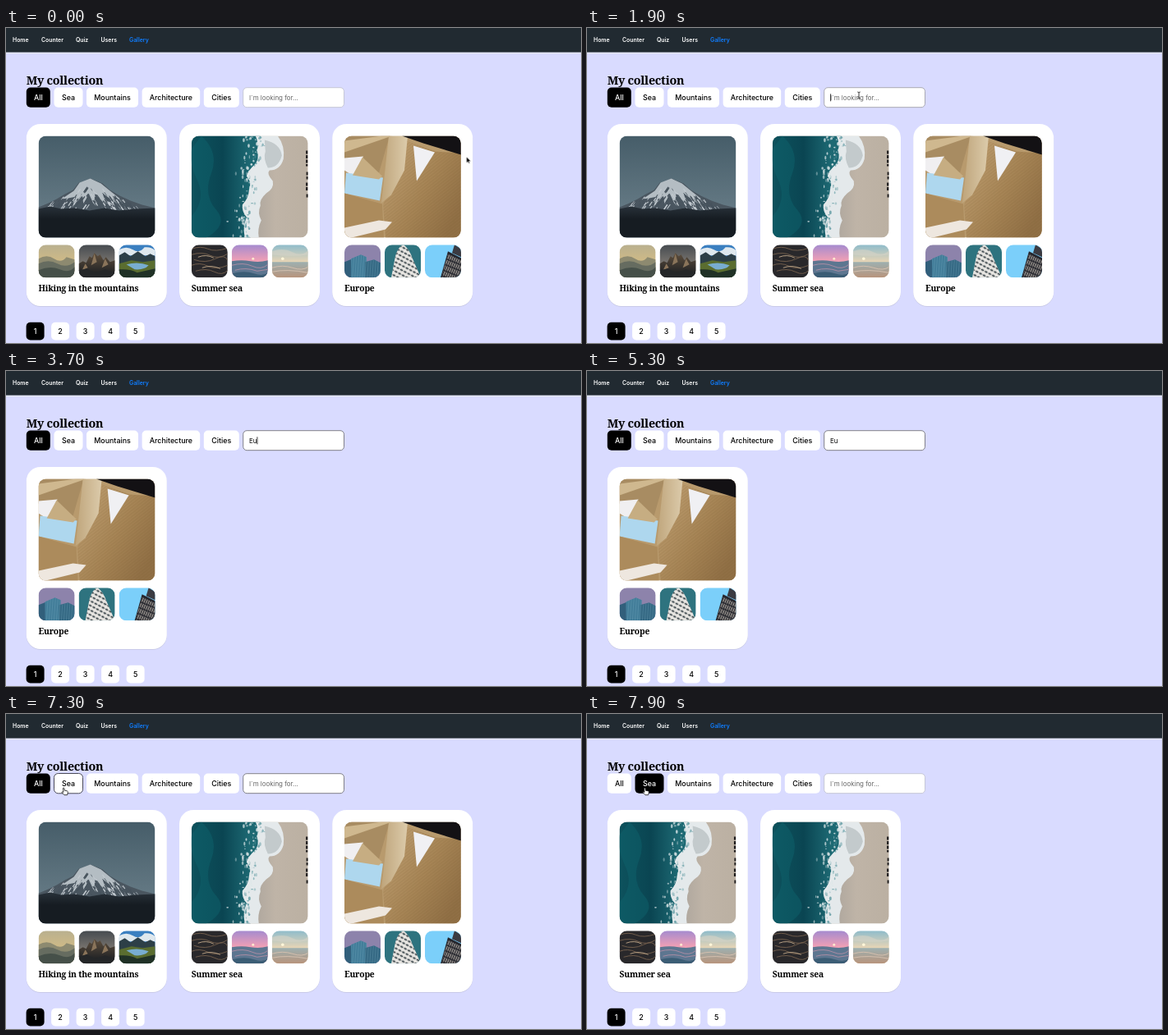
Animation of 700x384 px, one loop 8000 ms. Source, as an HTML page:

```html
<!DOCTYPE html>
<html lang="en">
<head>
<meta charset="utf-8">
<title>My collection</title>
<style>
  html, body { margin: 0; width: 100%; height: 100%; overflow: hidden; background: #d9dbff; }
  svg { display: block; width: 700px; height: 384px; }
  text { font: 500 8.9px Inter, sans-serif; fill: #000; }
  .serif { font: bold 10.3px "Noto Serif", serif; letter-spacing: -.2px; }
  .head { font-size: 14.3px; letter-spacing: -.25px; }
  .nav text { font-size: 6.9px; font-weight: 600; fill: #fff; }
  .nav .here { fill: #0f7dff; }
  .loading text { font-size: 10.2px; }
  .field text { font-size: 7.9px; font-weight: 400; }
  .field .hint { fill: #666; }
  .btn rect { fill: #fff; }
  .btn.on rect { fill: #000; }
  .btn.on text { fill: #fff; }

  .step, .step rect, .step text { animation: 8s step-end infinite; }
  .grid { animation-name: grid; }
  .found { animation-name: found; }
  .loading { animation-name: loading; }
  .picked { animation-name: picked; }
  .pages { animation-name: pages; }
  .box { animation-name: focus !important; }
  .hint { animation-name: hint !important; }
  .one { animation-name: one !important; }
  .two { animation-name: two !important; }
  .caret { animation-name: blink, caret !important; }
  .all rect { animation-name: allBox; }
  .all text { animation-name: allText; }
  .sea rect { animation-name: seaBox; }
  .sea text { animation-name: seaText; }
  .arrow { animation-name: arrow; }
  .beam { animation-name: beam; }
  .hand { animation-name: hand; }
  .mouse { animation: mouse 8s infinite; }

  @keyframes grid { 0%, 67.5% { opacity: 1 } 45%, 92.5%, 100% { opacity: 0 } }
  @keyframes found { 0%, 67.5%, 100% { opacity: 0 } 45% { opacity: 1 } }
  @keyframes loading { 0%, 98.75%, 100% { opacity: 0 } 92.5% { opacity: 1 } }
  @keyframes picked { 0% { opacity: 0 } 98.75%, 100% { opacity: 1 } }
  @keyframes pages { 0%, 98.75%, 100% { transform: none } 92.5% { transform: translateY(-209.5px) } }
  @keyframes focus { 0%, 92.5%, 100% { stroke: #c6c7d6 } 23.75% { stroke: #a9a9b2 } 25% { stroke: #808088 } }
  @keyframes hint { 0%, 70%, 100% { opacity: 1 } 40% { opacity: 0 } }
  @keyframes one { 0%, 45%, 70%, 100% { opacity: 0 } 40%, 67.5% { opacity: 1 } }
  @keyframes two { 0%, 67.5%, 100% { opacity: 0 } 45% { opacity: 1 } }
  @keyframes blink {
    0%, 30%, 51.25%, 63.75%, 76.25%, 88.75%, 100% { opacity: 0 }
    23.75%, 36.25%, 57.5%, 67.5%, 82.5% { opacity: 1 }
  }
  @keyframes caret {
    0%, 70%, 100% { transform: none }
    40%, 67.5% { transform: translateX(4.6px) }
    45% { transform: translateX(9.3px) }
  }
  @keyframes allBox { 0% { fill: #000 } 95%, 100% { fill: #fff } }
  @keyframes allText { 0% { fill: #fff } 95%, 100% { fill: #000 } }
  @keyframes seaBox {
    0% { fill: #fff; stroke: none }
    91.25% { fill: #fff; stroke: #4a4a58 }
    95%, 100% { fill: #000; stroke: none }
  }
  @keyframes seaText { 0% { fill: #000 } 95%, 100% { fill: #fff } }
  @keyframes arrow { 0% { opacity: 1 } 21.25%, 100% { opacity: 0 } }
  @keyframes beam { 0%, 40%, 83.75%, 100% { opacity: 0 } 21.25%, 81.25% { opacity: 1 } }
  @keyframes hand { 0% { opacity: 0 } 83.75%, 100% { opacity: 1 } }
  @keyframes mouse {
    0%, 3% { transform: translate(560.6px, 157px); animation-timing-function: ease-in }
    11.25% { transform: translate(538px, 142px); animation-timing-function: ease-out }
    22.5%, 81.25% { transform: translate(331px, 82px); animation-timing-function: ease-in-out }
    91.25%, 100% { transform: translate(70px, 90px) }
  }
</style>
</head>
<body>
<svg viewBox="0 0 700 384">
  <defs>
    <clipPath id="bigClip"><rect width="141.7" height="124" rx="9"/></clipPath>
    <clipPath id="smallClip"><rect width="44" height="40" rx="9"/></clipPath>

    <linearGradient id="dusk" x2="0" y2="1"><stop stop-color="#465d69"/><stop offset=".7" stop-color="#637883"/></linearGradient>
    <linearGradient id="forest" x2="0" y2="1"><stop stop-color="#283139"/><stop offset=".4" stop-color="#161c22"/></linearGradient>
    <linearGradient id="water"><stop stop-color="#0d525d"/><stop offset=".45" stop-color="#0a4552"/><stop offset=".85" stop-color="#1d6973"/></linearGradient>
    <linearGradient id="sand"><stop offset=".5" stop-color="#aaa39b"/><stop offset=".72" stop-color="#bfb4a7"/><stop offset="1" stop-color="#bbb0a2"/></linearGradient>
    <linearGradient id="beamLight"><stop stop-color="#bfa57b"/><stop offset="1" stop-color="#dccbab"/></linearGradient>
    <linearGradient id="wood" x2="1" y2=".7"><stop stop-color="#c4a477"/><stop offset=".6" stop-color="#a78556"/><stop offset="1" stop-color="#917046"/></linearGradient>
    <linearGradient id="haze" x2="0" y2="1"><stop stop-color="#b9b08f"/><stop offset=".5" stop-color="#cfba86"/></linearGradient>
    <linearGradient id="smoke" x2="0" y2="1"><stop stop-color="#464b50"/><stop offset=".6" stop-color="#7d7872"/></linearGradient>
    <linearGradient id="rock" x2="0" y2="1"><stop stop-color="#5f4f3d"/><stop offset=".8" stop-color="#232426"/></linearGradient>
    <linearGradient id="pink" x2="0" y2="1"><stop stop-color="#a58bcf"/><stop offset=".5" stop-color="#f2a0b4"/></linearGradient>
    <linearGradient id="dawn" x2="0" y2="1"><stop stop-color="#8fbccb"/><stop offset=".55" stop-color="#ecd6b4"/></linearGradient>
    <linearGradient id="shore" x2="0" y2="1"><stop stop-color="#9db0b0"/><stop offset="1" stop-color="#b8947c"/></linearGradient>

    <pattern id="grain" width="3" height="3" patternUnits="userSpaceOnUse" patternTransform="rotate(-38)">
      <path d="M0 1H3" stroke="#6f5126" stroke-opacity=".22"/>
    </pattern>
    <pattern id="panes" width="3" height="40" patternUnits="userSpaceOnUse" patternTransform="rotate(4)">
      <path d="M0 0V40" stroke="#7fb3c8" stroke-opacity=".5"/>
    </pattern>
    <pattern id="holes" width="5" height="5" patternUnits="userSpaceOnUse" patternTransform="rotate(28)">
      <ellipse cx="2.5" cy="2.5" rx="2" ry="1.1" fill="#2f3b41"/>
    </pattern>
    <pattern id="slats" width="2.6" height="7" patternUnits="userSpaceOnUse" patternTransform="rotate(22)">
      <path d="M1 0V5.6" stroke="#d9cfc4" stroke-width=".9"/>
    </pattern>

    <g id="mountains">
      <g class="big">
        <rect width="142" height="124" fill="url(#dusk)"/>
        <path d="M0 87L12 82 22 77 32 71 42 66 49 57 55 56 63 52 71 55 78 58 87 66 99 73 112 79 126 84 142 88V124H0Z" fill="#4a5660"/>
        <path d="M63 52L50 57 43 67 28 77 36 76 46 74 41 87 53 73 55 84 61 70 67 83 69 70 83 86 78 70 96 83 90 73 106 82 87 67 76 58Z" fill="#b4bdc3"/>
        <g id="ridges" stroke-linecap="round"/>
        <path d="M0 89L14 86 28 89 44 88 62 91 80 88 98 91 118 89 142 88V124H0Z" fill="url(#forest)"/>
      </g>
      <g class="small">
        <rect width="44" height="40" fill="url(#haze)"/>
        <path d="M0 17Q10 11 19 17T34 15L44 18V40H0Z" fill="#8d8a70"/>
        <path d="M0 23Q12 17 23 23T44 21V40H0Z" fill="#666c60"/>
        <path d="M0 31Q14 25 26 30T44 27V40H0Z" fill="#465049"/>
      </g>
      <g class="small">
        <rect width="44" height="40" fill="url(#smoke)"/>
        <path d="M0 23L5 20 9 22 13 14 16 16 19 10 23 14 26 12 30 19 33 15 38 21 44 19V40H0Z" fill="url(#rock)"/>
        <path d="M19 11L15 25 22 21ZM32 17L28 28 36 24ZM8 23L4 31 11 28Z" fill="#8a745a"/>
        <path d="M0 31L10 29 20 34 32 30 44 34V40H0Z" fill="#242628"/>
      </g>
      <g class="small">
        <rect width="44" height="40" fill="#3a7fc0"/>
        <path d="M0 6Q9 1 17 6T31 3Q39 2 44 7V13H0Z" fill="#dfe8ee"/>
        <path d="M0 13L7 9 14 14 23 8 32 14 38 11 44 14V40H0Z" fill="#2d3f47"/>
        <path d="M0 23L15 19 29 21 44 19V40H0Z" fill="#5a6d30"/>
        <path d="M9 24Q23 20 36 25 31 31 19 30Z" fill="#78add1"/>
        <path d="M0 30Q14 29 22 34L44 29V40H0Z" fill="#203126"/>
      </g>
    </g>

    <g id="coast">
      <g class="big">
        <rect width="142" height="124" fill="url(#sand)"/>
        <path d="M0 0H84L84 28 76 50 77 72 70 92 72 124H0Z" fill="url(#water)"/>
        <path d="M12 0Q34 20 24 46T30 90 18 124H0V98Q18 78 7 54T0 16Z" fill="#0f626c" opacity=".5"/>
        <path d="M78 0Q82 9 80 18 83 28 77 35 69 42 67 49 74 57 70 66 70 75 62 84 61 92 67 99 62 111 65 124H82Q80 113 85 103 80 94 84 85 82 78 91 70 101 64 99 55 91 46 95 42 108 42 112 28 114 12 105 0Z" fill="#e4e9eb"/>
        <path d="M89 5Q108 9 110 24 106 39 93 39 87 27 90 19Z" fill="#c3cacc"/>
        <g id="foam"/>
        <path d="M140.5 18V37M141 44V53M140.5 57V67M141 71V76" stroke="#1c1a1b" stroke-width="2.4" stroke-dasharray="4 1.5"/>
      </g>
      <g class="small">
        <rect width="44" height="40" fill="#29282b"/>
        <path d="M0 5Q11 1 20 5T44 4M0 12Q13 8 23 13T44 11M3 18Q17 23 29 17T44 19M0 25Q10 21 20 26T44 25M5 32Q18 28 28 33T44 31" fill="none" stroke="#76614f" stroke-width=".9"/>
        <path d="M8 15Q18 11 27 16M13 28Q24 24 35 29" fill="none" stroke="#d6ba97" stroke-width=".8"/>
      </g>
      <g class="small">
        <rect width="44" height="40" fill="url(#pink)"/>
        <circle cx="26" cy="17" r="1.5" fill="#ffe9cf"/>
        <path d="M0 20Q12 18 23 20T44 19V40H0Z" fill="#5d7690"/>
        <path d="M0 25Q14 21 25 26T44 24M4 31Q17 27 31 32L44 30" fill="none" stroke="#a98ca3"/>
        <path d="M0 35Q16 31 27 35T44 34V40H0Z" fill="#3b5d75"/>
      </g>
      <g class="small">
        <rect width="44" height="40" fill="url(#dawn)"/>
        <path d="M0 8Q14 3 25 9T44 7V12Q25 15 0 12Z" fill="#d8d4c7" opacity=".6"/>
        <circle cx="13" cy="17" r="1.8" fill="#fff6d9"/>
        <path d="M0 21H44V40H0Z" fill="url(#shore)"/>
        <path d="M0 28Q13 24 25 28T44 27M0 33Q18 29 44 34" fill="none" stroke="#d3bfae"/>
      </g>
    </g>

    <g id="europe">
      <g class="big">
        <rect width="142" height="124" fill="#b89a6d"/>
        <path d="M0 0H55L42 45 0 30Z" fill="#a88c62"/>
        <path d="M0 6L46 0H58L0 20Z" fill="#cfb88f"/>
        <path d="M0 27L23 25 11 49 0 42Z" fill="#f0eff1"/>
        <path d="M2 45L47 51 43 79 0 70Z" fill="#aed7ee"/>
        <path d="M22 26L46 49 42 53 10 48Z" fill="#c6ad82"/>
        <path d="M0 70L46 83 48 124H0Z" fill="#ac8b5c"/>
        <path d="M76 6L111 19 142 21V124H50L47 84 56 62Z" fill="url(#wood)"/>
        <path d="M76 6L111 19 142 21V124H50L47 84 56 62Z" fill="url(#grain)"/>
        <path d="M54 0H77L73 42 57 72 45 82Z" fill="url(#beamLight)"/>
        <path d="M84 12L110 20 88 55Z" fill="#f0f0f3"/>
        <path d="M70 0H142V23L96 9Z" fill="#131114"/>
        <path d="M0 112L42 103 58 105 50 114 9 124H0Z" fill="#eee7df"/>
      </g>
      <g class="small">
        <rect width="44" height="40" fill="#8d83ab"/>
        <path d="M0 21L10 17V40H0Z" fill="#315f7b"/>
        <path d="M8 17L20 12 27 15V40H8Z" fill="#427d99"/>
        <path d="M25 21L36 18 44 22V40H25Z" fill="#356984"/>
        <path d="M8 17L20 12 27 15V21L36 18 44 22V40H8Z" fill="url(#panes)"/>
      </g>
      <g class="small">
        <rect width="44" height="40" fill="#2e737f"/>
        <path d="M8 40L13 14Q17 1 23 0 30 5 34 17L44 40Z" fill="#e9e7e3"/>
        <path d="M8 40L13 14Q17 1 23 0 30 5 34 17L44 40Z" fill="url(#holes)"/>
      </g>
      <g class="small">
        <rect width="44" height="40" fill="#7bcffa"/>
        <path d="M28 8L44 16V40H19Z" fill="#25262d"/>
        <path d="M28 11L44 19V40H20Z" fill="url(#slats)"/>
        <path d="M36 0L44 5V15L33 10Z" fill="#3b3b42"/>
      </g>
    </g>
  </defs>

  <rect width="700" height="384" fill="#d9dbff"/>
  <rect width="700" height="31" fill="#e8eaff"/>
  <rect width="700" height="29.6" fill="#212a31"/>
  <g class="nav">
    <text x="8" y="17">Home</text>
    <text x="43" y="17">Counter</text>
    <text x="85" y="17">Quiz</text>
    <text x="115.5" y="17">Users</text>
    <text x="150" y="17" class="here">Gallery</text>
  </g>
  <text class="serif head" x="24.7" y="69">My collection</text>

  <g id="filters"></g>
  <g class="field step">
    <rect class="box" x="288.7" y="72.7" width="122.8" height="24" rx="4.5" fill="#fff"/>
    <text class="hint" x="296" y="87.6">I`m looking for...</text>
    <text class="one" x="296" y="87.6">E</text>
    <text class="two" x="296" y="87.6">Eu</text>
    <rect class="caret" x="296.3" y="80.3" width=".8" height="9"/>
  </g>

  <g class="grid step" data-cards="mountains coast europe"></g>
  <g class="found step" data-cards="europe"></g>
  <g class="picked step" data-cards="coast coast"></g>
  <g class="loading step"><text x="24.7" y="127">Loading...</text></g>
  <g id="pages" class="pages step"></g>

  <g class="mouse">
    <path class="arrow step" d="M0 0V7.4L1.7 5.9 2.8 8.3 4 7.8 2.9 5.4H5.1Z" fill="#000" stroke="#fff" stroke-width=".5"/>
    <path class="beam step" d="M-1.7 -4Q0 -4 0 -3V3Q0 4 -1.7 4M1.7 -4Q0 -4 0 -3M0 3Q0 4 1.7 4" fill="none" stroke="#222" stroke-width=".9"/>
    <path class="hand step" d="M-.6 .4Q.3 -.6 1 .5L1.4 3.2 4.6 3.9Q5.6 4.2 5.3 5.7L4.6 8.7H.9L-2 5.6Q-2 4.5 -.9 4.9L0 5.4Z" fill="#fff" stroke="#111" stroke-width=".8"/>
  </g>
</svg>
<script>
  const $ = s => document.querySelector(s);
  const titles = { mountains: 'Hiking in the mountains', coast: 'Summer sea', europe: 'Europe' };

  const button = (label, x, y, w, h, cls = '') =>
    `<g class="btn ${cls}"><rect x="${x}" y="${y}" width="${w}" height="${h}" rx="5"/>
     <text x="${x + w / 2}" y="${y + h / 2 + 3.2}" text-anchor="middle">${label}</text></g>`;

  const card = (name, i) =>
    `<g transform="translate(${24.8 + 186.2 * i} 117)">
      <rect y=".8" width="171" height="222" rx="17" fill="#c3c5e2"/>
      <rect width="171" height="222" rx="17" fill="#fff"/>
      <use href="#${name}" x="14.8" y="14.6"/>
      <text class="serif" x="14.7" y="204.4">${titles[name]}</text></g>`;

  $('#filters').innerHTML = [
    ['All', 24.8, 29, 'all step'], ['Sea', 58.5, 35, 'sea step'], ['Mountains', 98, 63],
    ['Architecture', 165.6, 70.6], ['Cities', 240.8, 43]
  ].map(([label, x, w, cls]) => button(label, x, 72.5, w, 24.3, cls)).join('');

  $('#pages').innerHTML = [1, 2, 3, 4, 5]
    .map((n, i) => button(n, 24.6 + 30.5 * i, 358.7, 22, 21.8, i ? '' : 'on')).join('');

  // Lay each set of photos out as one large picture above three thumbnails.
  for (const name in titles) {
    [...$('#' + name).children].forEach((photo, i) => {
      photo.setAttribute('clip-path', `url(#${i ? 'small' : 'big'}Clip)`);
      if (i) photo.setAttribute('transform', `translate(${49 * (i - 1)} 132.7)`);
    });
  }

  let seed = 7;
  const rand = () => (seed = seed * 16807 % 2147483647) / 2147483647;
  const scatter = (id, count, mark) => $(id).innerHTML = Array.from({ length: count }, mark).join('');

  // Rock and snow streaks running down from the summit.
  scatter('#ridges', 150, () => {
    const x = 12 + rand() * 108, top = 57 + Math.abs(x - 63) * .5;
    const y = top + rand() * Math.max(0, 88 - top), len = 2 + rand() * 4;
    const color = rand() < .6 ? '#46525c' : '#c3cad0';
    return `<path d="M${x} ${y}l${len * (x < 63 ? -.7 : .7)} ${len}" stroke="${color}" stroke-width="${.6 + rand()}"/>`;
  });

  // Loose spray on the water side of the surf, and teal gaps in the foam.
  scatter('#foam', 170, () => {
    const y = rand() * 124, gap = rand() < .3;
    const edge = 78 - y * .13 + Math.sin(y / 9) * 4;
    const x = edge + (gap ? rand() * 9 : 3 - rand() * rand() * 22);
    return `<ellipse cx="${x}" cy="${y}" rx="${.5 + rand()}" ry="${.5 + rand() * 2}"
      fill="${gap ? '#5f9aa2' : '#dde7e9'}" opacity="${.3 + rand() * .6}"/>`;
  });

  document.querySelectorAll('[data-cards]').forEach(g => {
    g.innerHTML = g.dataset.cards.split(' ').map(card).join('');
  });
</script>
</body>
</html>
```
